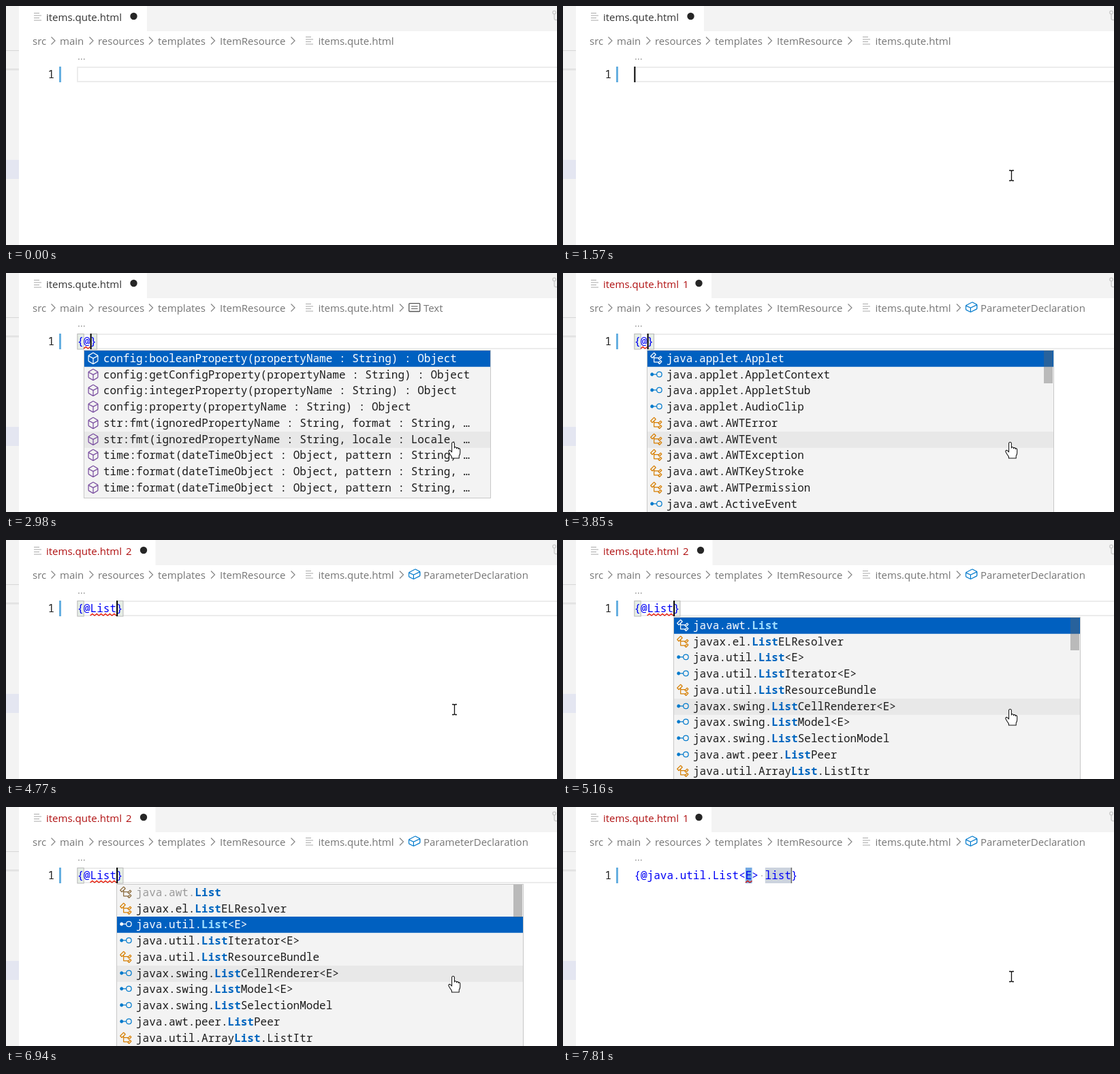
An HTML page for the animation above (8000 ms loop, 809 by 351 pixels).

```html
<!DOCTYPE html>
<html lang="en">
<head>
<meta charset="utf-8">
<title>Template completion</title>
<style>
html, body { margin: 0; width: 100%; height: 100%; overflow: hidden; background: #fff; }
svg { display: block; width: 809px; height: 351px; }
text { white-space: pre; }
.ui { font: 15px "Open Sans", sans-serif; }
.code { font: 16.03px "Noto Sans Mono", monospace; }
.picked { font-weight: 500; }
.hit { font-weight: 700; }
</style>
</head>
<body>
<svg id="stage" viewBox="0 0 809 351">
  <rect width="809" height="37" fill="#f3f3f3"/>
  <rect width="19" height="351" fill="#f3f3f3"/>
  <path d="M0 65.5H19" stroke="#d6d6d6"/>
  <path d="M0 92.5H19" stroke="#dcdcdc"/>
  <path d="M0 94H19" stroke="#e8e8e8" stroke-width="2"/>
  <rect y="226" width="19" height="28" fill="#e4e6f1"/>
  <g fill="none" stroke="#cacaca" stroke-width="1.3">
    <circle cx="805" cy="9.5" r="2.3"/><path d="M805 12V18q0 2.500 2.500 2.500H809"/>
  </g>
  <g id="crumbs"></g>
  <g id="live"></g>
</svg>
<script>
const LOOP = 8000, CHAR = 9.62, X0 = 104.4, ROW = 23.75;
const $ = id => document.getElementById(id);
const col = n => X0 + n * CHAR;
const esc = s => s.replace(/&/g, "&amp;").replace(/</g, "&lt;");
const text = (cls, x, y, fill, s) => `<text class="${cls}" x="${x}" y="${y}" fill="${fill}">${s}</text>`;
const rect = (x, y, w, h, fill, more = "") =>
  `<rect x="${x}" y="${y}" width="${w}" height="${h}" fill="${fill}" ${more}/>`;

const ICONS = {
  method: ["#7a4fa0", "M13.5 4l-5-3h-1l-5 3-.5.86v6l.5.85 5 3h1l5-3 .5-.85v-6L13.5 4zm-6 9.56l-4.5-2.7V5.7l4.5 2.45v5.41zM3.27 4.7L8 1.86l4.74 2.84L8 7.29 3.27 4.7zM13 10.86l-4.5 2.7V8.15L13 5.7v5.16z"],
  type: ["#d67e00", "M11.34 9.71h.71l2.67-2.67v-.71L13.38 5h-.7l-1.82 1.81h-5V5.56l1.86-1.85V3l-2-2H5L1 5v.71l2 2h.71l1.14-1.15v5.79l.5.5H10v.52l1.33 1.34h.71l2.67-2.67v-.71L13.37 10h-.7l-1.86 1.85h-5v-4H10v.48l1.34 1.38zm1.69-3.65.63.63-2 2-.63-.63 2-2zm0 5 .63.63-2 2-.63-.63 2-2zM3.35 6.65l-1.29-1.3 3.29-3.29 1.3 1.29-3.3 3.3z"],
  face: ["#007acc", "M11.5 4A3.5 3.5 0 0 0 8.04 7h-3.1a2 2 0 1 0 0 1h3.1a3.5 3.5 0 1 0 3.46-4zm0 6a2.5 2.5 0 1 1 0-5 2.5 2.5 0 0 1 0 5z"],
  field: ["#007acc", "M14.45 4.5l-5-2.5h-.9l-7 3.5-.55.89v4.5l.55.9 5 2.5h.9l7-3.5.55-.9v-4.5l-.55-.89zm-8 8.64l-4.5-2.25V7.17l4.5 2v3.97zm.5-4.8L2.29 6.23l6.66-3.34 4.67 2.34-6.67 3.11zm7 1.55l-6.5 3.25V9.21l6.5-3v3.68z"]
};
const icon = (kind, x, y, fill) =>
  `<path transform="translate(${x} ${y}) scale(1.25)" fill="${fill || ICONS[kind][0]}" d="${ICONS[kind][1]}"/>`;
const fileIcon = (x, y) =>
  `<path d="M${x} ${y}h8m-8 3.5h11m-11 3.5h8m-8 3.5h11" stroke="#a9a9a9" stroke-width="1.2" fill="none"/>`;
const chevron = x => `<path d="M${x - 3} 45.5l5.5 5.5-5.5 5.5" fill="none" stroke="#858585" stroke-width="1.2"/>`;

const METHODS = [
  "config:booleanProperty(propertyName : String) : Object",
  "config:getConfigProperty(propertyName : String) : Object",
  "config:integerProperty(propertyName : String) : Object",
  "config:property(propertyName : String) : Object",
  "str:fmt(ignoredPropertyName : String, format : String, …",
  "str:fmt(ignoredPropertyName : String, locale : Locale, …",
  "time:format(dateTimeObject : Object, pattern : String) …",
  "time:format(dateTimeObject : Object, pattern : String, …",
  "time:format(dateTimeObject : Object, pattern : String, …"
].map(s => ["method", s]);
const TYPES = [
  ["type", "java.applet.Applet"],
  ["face", "java.applet.AppletContext"],
  ["face", "java.applet.AppletStub"],
  ["face", "java.applet.AudioClip"],
  ["type", "java.awt.AWTError"],
  ["type", "java.awt.AWTEvent"],
  ["type", "java.awt.AWTException"],
  ["type", "java.awt.AWTKeyStroke"],
  ["type", "java.awt.AWTPermission"],
  ["face", "java.awt.ActiveEvent"]
];
const LISTS = [
  ["type", "java.awt.List"],
  ["type", "javax.el.ListELResolver"],
  ["face", "java.util.List<E>"],
  ["face", "java.util.ListIterator<E>"],
  ["type", "java.util.ListResourceBundle"],
  ["face", "javax.swing.ListCellRenderer<E>"],
  ["face", "javax.swing.ListModel<E>"],
  ["face", "javax.swing.ListSelectionModel"],
  ["face", "java.awt.peer.ListPeer"],
  ["type", "java.util.ArrayList.ListItr"]
];

// Each track lists [start time, value]; the latest started value holds.
const at = (track, t) => track.reduce((v, [from, next]) => t >= from ? next : v, track[0][1]);
const CODE = [[0, ""], [1650, "{}"], [2890, "{@}"], [4240, "{@L}"], [4400, "{@Li}"],
  [4550, "{@Lis}"], [4690, "{@List}"], [7270, "{@java.util.List<E> list}"]];
const CARET = [[0, 0], [510, 1], [1040, 0], [1570, 1], [2500, 0], [2890, 1], [3390, 0], [3850, 1],
  [5250, 0], [5790, 1], [6260, 0], [6720, 1], [7810, 0]];
const LENS = [[0, 1], [1650, 0], [2360, 1]];
const ERRORS = [[0, 0], [3080, 1], [4620, 2], [7420, 1]];
const SYMBOL = [[0, ""], [2270, "Text"], [3220, "ParameterDeclaration"]];
const POPUP = [[0, null], [1960, METHODS], [3080, TYPES], [4330, null], [5000, LISTS], [7270, null]];
const PICK = [[0, 0], [6760, 1], [6940, 2]];
const HAND = [[0, 0], [2000, 1], [4400, 0], [5080, 1], [7350, 0]];

function tab(errors) {
  const right = [207, 218, 219.5][errors], dot = [187.5, 199.5, 202][errors];
  const red = "#b01011";
  return rect(19, 0, right - 19, 38, "#fff") + fileIcon(41, 10.5) +
    text("ui", 59, 22, errors ? red : "#333", "items.qute.html") +
    (errors ? text("ui", 176, 21.5, red, errors) : "") +
    `<circle cx="${dot}" cy="15" r="5.2" fill="#262626"/>`;
}

function symbol(name) {
  if (!name) return "";
  const mark = name === "Text"
    ? `<rect x="591.7" y="44.700" width="16" height="11.800" rx="1" fill="none" stroke="#555" stroke-width="1.3"/>` +
      `<path d="M595 49h9.500m-9.500 3.500h9.500" stroke="#555" stroke-width="1.2"/>`
    : icon("field", 589.7, 40);
  return chevron(581) + mark + text("ui", 613, 57, "#757575", name);
}

function squiggle(from, to, y) {
  let d = `M${col(from)} ${y}`, x = col(from), up = true;
  for (; x < col(to) - 1; x += 3.2, up = !up) d += `l3.2 ${up ? -2.6 : 2.6}`;
  return `<path d="${d}" fill="none" stroke="#e51400" stroke-width="1.3"/>`;
}

function editor(t, code, lens) {
  const top = lens ? 89 : 65, done = t >= 7270;
  const bracket = n => rect(col(n) + .5, top + .5, CHAR - .3, 22.5, "#e6eee6", 'stroke="#b9b9b9"');
  let s = text("code", 61.5, top + 17, "#222", "1") + rect(78, top, 3, 23, "#66afe0");
  if (lens) s += text("ui", 105, 79, "#999", "…");
  if (!done) s += rect(105, top + 1, 720, 21, "none", 'stroke="#ececec" stroke-width="2"');
  if (done) {
    s += rect(col(17), 89, CHAR, 23, "#74a9e2") + rect(col(20), 89, 4 * CHAR, 23, "#ccd3de") +
      rect(col(24) - .6, 89, 1.5, 23, "#666") +
      `<circle cx="${col(19.5)}" cy="101" r="1" fill="#b5b5b5"/>`;
  } else if (code) {
    s += bracket(0) + bracket(code.length - 1);
  }
  s += text("code", X0, top + 17, t < 2360 ? "#111" : "#0000f5", esc(code));
  if (done) s += squiggle(17, 18, 111);
  else if (code.length === 3) s += squiggle(1, 2, 111);
  else if (code.length > 3) s += squiggle(2, code.length - 1, 111);
  if (at(CARET, t)) s += rect(col(done ? 18 : Math.max(0, code.length - 1)), top, 2, 23, "#000");
  return s;
}

function label(s, picked) {
  const k = s.indexOf("List");
  return esc(s.slice(0, k)) + `<tspan class="hit" fill="${picked ? "#9dddff" : "#0066bf"}">List</tspan>` + esc(s.slice(k + 4));
}

function popup(t, rows, lens, mouse) {
  if (!rows) return "";
  const x = rows === METHODS ? 114 : rows === TYPES ? 123 : 162, top = lens ? 113 : 89;
  const pick = at(PICK, t), hover = Math.floor((mouse[1] - top - 1) / ROW);
  let s = rect(x + .5, top + .5, 597, rows === METHODS ? 217 : 300, "#f3f3f3", 'stroke="#c8c8c8"');
  rows.forEach(([kind, name], i) => {
    const y = Math.round(top + .9 + i * ROW), on = i === pick;
    if (on || i === hover) s += rect(x + 1, y, 596, ROW, on ? "#0060c0" : "#e8e8e8");
    const faded = rows === LISTS && i === 0 && pick === 2;
    const ink = on ? "#fff" : faded ? "#9a9a9a" : "#1c1c1c";
    s += icon(kind, x + 4, y + 1.5, on ? "#fff" : faded ? "#8a6a3c" : "") +
      text(on ? "code picked" : "code", x + 29, y + 17, ink, rows === LISTS ? label(name, on) : esc(name));
  });
  if (rows !== METHODS) s += rect(x + 583, top + 1, 13, 48, "#646464", 'opacity=".4"');
  return s;
}

function pointer(t, [x, y]) {
  const shape = at(HAND, t)
    ? `<path transform="translate(-2 0) scale(.95 1)" d="M-2 1.5a2 2 0 0 1 4 0V8q0-1.6 1.7-1.3 1.6.2 1.7 1.9.1-1.3 1.6-1 1.3.2 1.4 1.8.2-1 1.4-.7 1 .3 1 1.8V15q0 2.5-1.6 4.5V23H-2.2v-2.3Q-4 18.5-6.6 14.2-7.6 12-6 11.4-4.4 11-2 14z" fill="#fff" stroke="#111" stroke-width="1.1" stroke-linejoin="round"/>`
    : `<path d="M-3.5-7.5h2.5l1 1 1-1h2.5M0-6.5V6.5M-3.5 7.5h2.5l1-1 1 1h2.5" fill="none" stroke="#111" stroke-width="1.3"/>`;
  return `<g transform="translate(${x.toFixed(1)} ${y.toFixed(1)})">${shape}</g>`;
}

function mouseAt(t) {
  const p = Math.min(1, Math.max(0, (t - 70) / 600)), left = (1 - p) ** 2;
  return [658.5 + 40 * left, 249 + 112 * left];
}

function scene(t) {
  const lens = at(LENS, t), mouse = mouseAt(t);
  return tab(at(ERRORS, t)) + symbol(at(SYMBOL, t)) + editor(t, at(CODE, t), lens) +
    popup(t, at(POPUP, t), lens, mouse) + pointer(t, mouse);
}

$("crumbs").innerHTML = [[39, "src"], [79, "main"], [135, "resources"], [223, "templates"],
  [314, "ItemResource"], [458.5, "items.qute.html"]].map(([x, s]) => text("ui", x, 57, "#757575", s)).join("") +
  [69.5, 125.5, 213, 304, 421.5].map(chevron).join("") + fileIcon(440, 45.5);

let last = "";
function frame(now) {
  const next = scene(now % LOOP);
  if (next !== last) $("live").innerHTML = last = next;
  requestAnimationFrame(frame);
}
frame(0);
</script>
</body>
</html>
```
